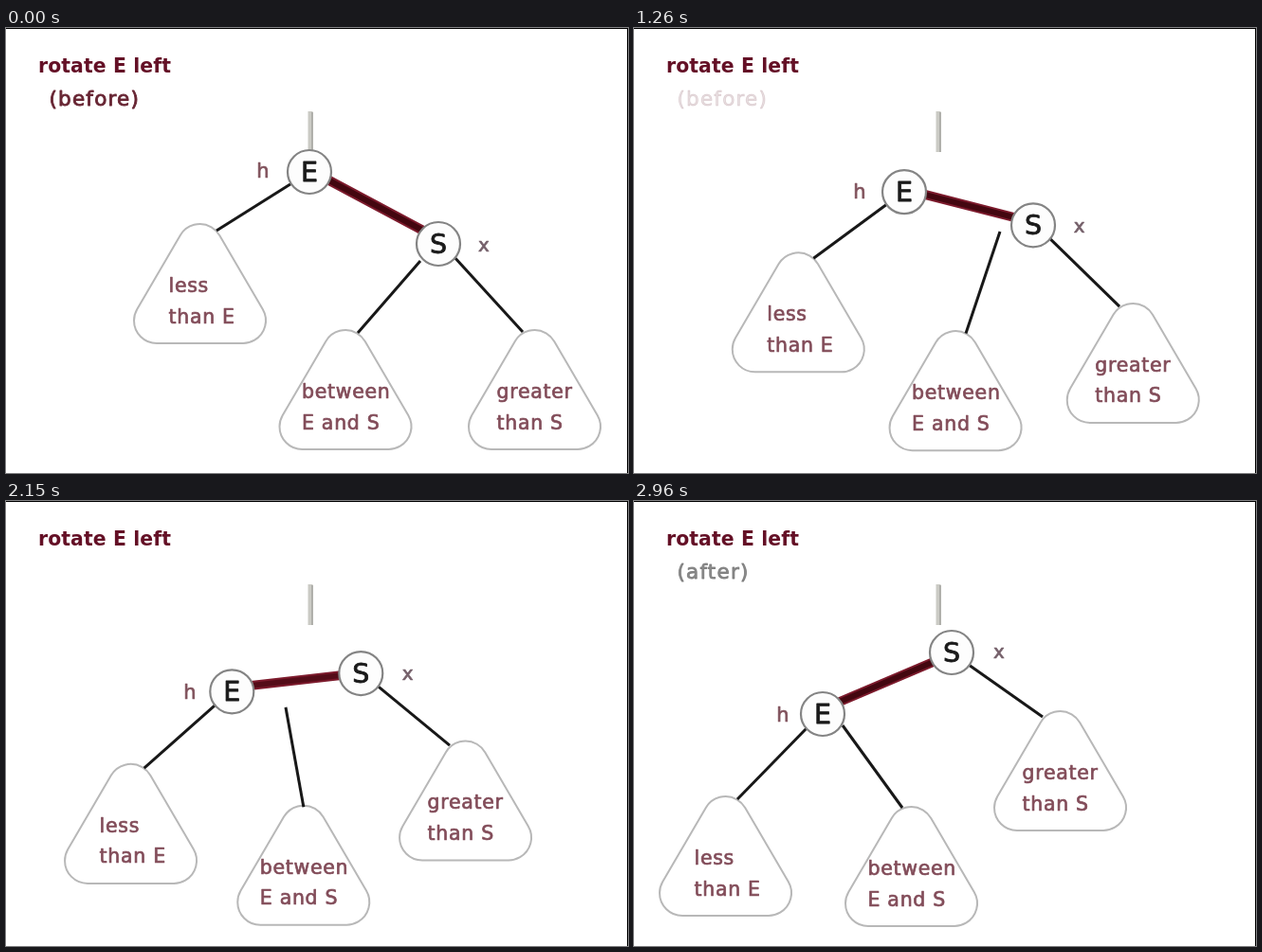
Recreate the animation shown at these times as an HTML page with a canvas. Size 656 px wide and 470 px high, loop 3000 ms.

```html
<!DOCTYPE html>
<html lang="en">
<head>
<meta charset="utf-8">
<title>Rotate left</title>
<style>
html, body { margin: 0; width: 656px; height: 470px; overflow: hidden; background: #fff; }
canvas { display: block; }
</style>
</head>
<body>
<canvas id="stage" width="656" height="470"></canvas>
<script>
const ctx = document.getElementById("stage").getContext("2d");
const LOOP = 3000, HOLD = 200, STEP = 40.5;
const FONT = '"DejaVu Sans", sans-serif';

// Values at a few steps, joined by a smooth curve
const steps = [0, 8, 19, 27, 40, 58, 69];
const shift = [0, 6, 21, 35, 64, 99, 121];
const midTopX = [437, 431, 413, 386, 330, 261, 220];
const midTopY = [246, 238, 221, 215, 214, 224, 237];
const midEndX = [371, 367, 360, 350, 329, 299, 283];

function slope(v, i) {
  if (i === 0) return 0;
  const b = Math.min(i + 1, v.length - 1);
  return (v[b] - v[i - 1]) / (steps[b] - steps[i - 1]);
}

function curve(v, n) {
  let i = 0;
  while (i < steps.length - 2 && n > steps[i + 1]) i++;
  const d = steps[i + 1] - steps[i], s = (n - steps[i]) / d;
  const s2 = s * s, s3 = s2 * s;
  return v[i] * (2 * s3 - 3 * s2 + 1) + v[i + 1] * (3 * s2 - 2 * s3) +
    d * (slope(v, i) * (s3 - 2 * s2 + s) + slope(v, i + 1) * (s3 - s2));
}

const clamp = v => Math.max(0, Math.min(1, v));
const mix = (a, b, u) => a.map((v, i) => v + (b[i] - v) * u);

function line(a, b, width, color) {
  ctx.lineWidth = width;
  ctx.strokeStyle = color;
  ctx.beginPath();
  ctx.moveTo(a[0], a[1]);
  ctx.lineTo(b[0], b[1]);
  ctx.stroke();
}

function text(str, x, y, { size = 20.5, color, weight = "", align = "left", gap = 0, edge = 0 }) {
  ctx.font = `${weight} ${size}px ${FONT}`;
  ctx.textAlign = align;
  ctx.letterSpacing = gap + "px";
  ctx.fillStyle = ctx.strokeStyle = color;
  ctx.lineJoin = "round";
  ctx.fillText(str, x, y);
  if (edge) {
    ctx.lineWidth = edge;
    ctx.strokeText(str, x, y);
  }
}

function subtree([x, y], first, second, dx) {
  const r = 24, half = 45.5, rise = 78;
  const a = Math.atan2(half, rise);
  ctx.beginPath();
  ctx.arc(x, y + r, r, Math.PI + a, -a);
  ctx.arc(x + half, y + r + rise, r, -a, Math.PI / 2);
  ctx.arc(x - half, y + r + rise, r, Math.PI / 2, Math.PI + a);
  ctx.closePath();
  ctx.lineWidth = 2;
  ctx.strokeStyle = "#b8b8b8";
  ctx.stroke();
  const style = { color: "#824c59", gap: 0.7, edge: 0.7 };
  text(first, x + dx, y + 72, style);
  text(second, x + dx, y + 104.5, style);
}

function node([x, y], label) {
  ctx.beginPath();
  ctx.arc(x, y, 23, 0, 2 * Math.PI);
  ctx.fillStyle = "#fdfdfd";
  ctx.fill();
  ctx.lineWidth = 2.2;
  ctx.strokeStyle = "#848484";
  ctx.stroke();
  text(label, x, y + 10, { size: 28.5, color: "#1a1a1a", align: "center", edge: 0.8 });
}

function caption(str, color, alpha) {
  if (alpha <= 0) return;
  ctx.globalAlpha = alpha;
  text(str, 45.5, 82, { size: 21.5, color, gap: 1.2, edge: 0.9 });
  ctx.globalAlpha = 1;
}

function draw(t) {
  const n = t < HOLD ? 0 : Math.min(69, 1 + Math.floor((t - HOLD) / STEP + 0.001));
  const u = curve(shift, n) / 121;

  ctx.fillStyle = "#fff";
  ctx.fillRect(0, 0, 656, 470);
  ctx.fillStyle = "#000";
  ctx.fillRect(0, 0, 656, 1);
  ctx.fillRect(655, 0, 1, 470);

  text("rotate E left", 34, 47, { size: 20.4, color: "#641026", weight: "bold", gap: 0.1 });
  caption("(before)", "#682634", n < 8 ? 1 : clamp(1 - (n - 8) / 22));
  caption("(after)", "#707070", 0.8 * clamp((n - 60) / 9));

  // Link from the parent
  line([321, 88], [321, 131], 5, "#cbcbc5");
  line([323, 89], [323, 131], 1.5, "#a2a29e");

  subtree(mix([204.5, 207], [96.5, 312], u), "less", "than E", -33);
  subtree(mix([358, 319], [292.5, 323], u), "between", "E and S", -46);
  subtree(mix([557.5, 319], [449.5, 222], u), "greater", "than S", -40);

  const ink = "#181818";
  line(mix([303, 163], [183, 239], u), mix([222, 214], [109, 315], u), 3, ink);
  line(mix([472, 241], [353, 173], u), mix([545, 321], [431, 228], u), 3, ink);
  line([curve(midTopX, n), curve(midTopY, n)], [curve(midEndX, n), 322 + 2 * u], 3, ink);

  // Red link, darker inside when tilted
  const a = mix([339, 160], [217, 212], u), b = mix([440, 214], [318, 169], u);
  line(a, b, 10, "#7c1a2c");
  ctx.globalAlpha = 0.25 + 0.75 * clamp(Math.abs(b[1] - a[1]) / 20);
  line(a, b, 6, "#430710");
  ctx.globalAlpha = 1;

  node(mix([320, 152], [199, 225], u), "E");
  node(mix([456, 228], [335, 160], u), "S");

  const h = mix([271, 158], [157, 233], u), x = mix([504, 236], [385, 166], u);
  text("h", h[0], h[1], { size: 21, color: "#80525c", align: "center", edge: 0.7 });
  text("x", x[0], x[1], { size: 20, color: "#75606a", align: "center", edge: 0.7 });
}

const start = performance.now();
function tick() {
  draw((performance.now() - start) % LOOP);
  requestAnimationFrame(tick);
}
tick();
</script>
</body>
</html>
```
